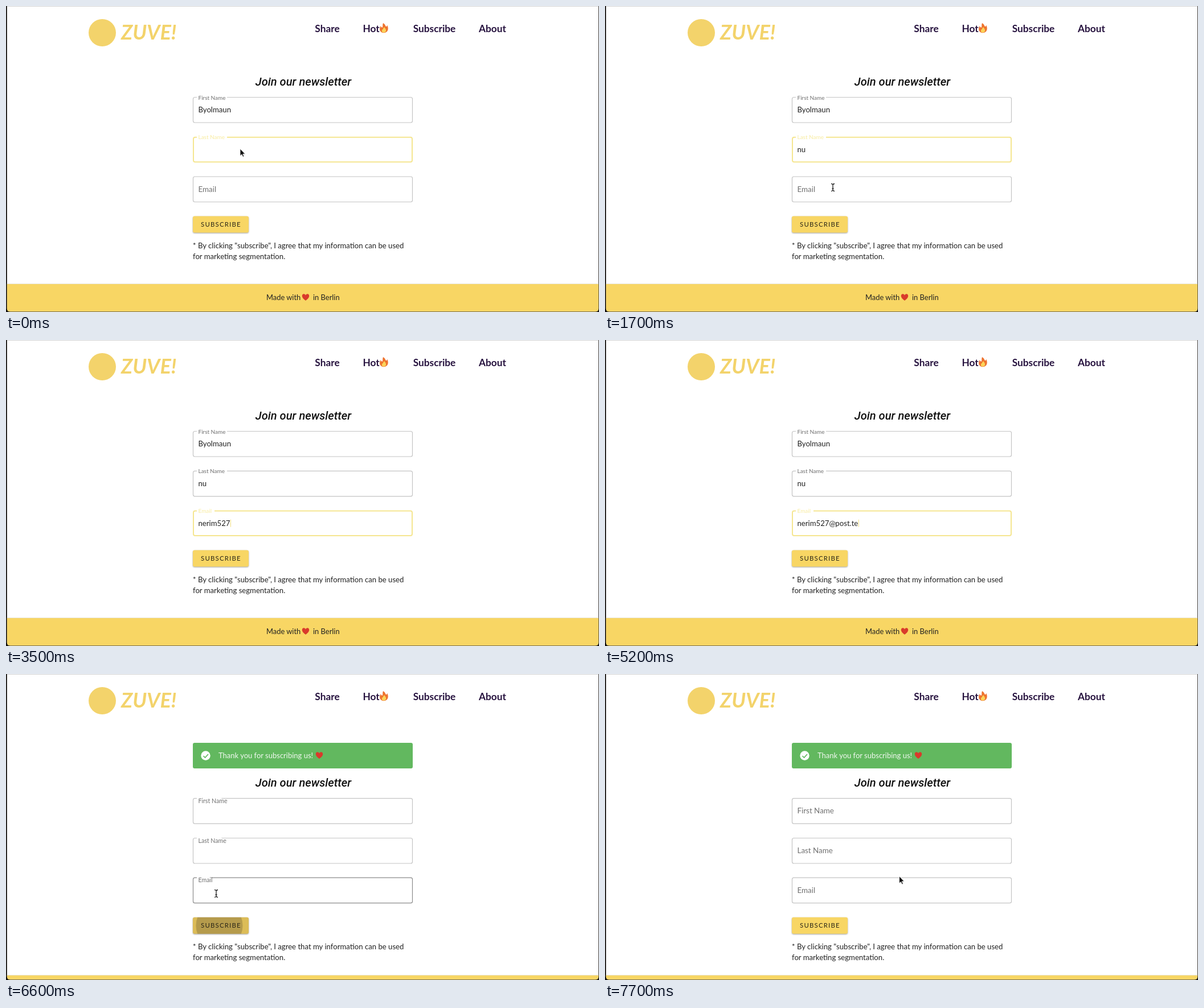
An HTML page for the animation above (7800 ms loop, 1041 by 538 pixels).

```html
<!DOCTYPE html>
<html lang="en">
<head>
<meta charset="utf-8">
<title>Newsletter form</title>
<style>
html, body { margin: 0; height: 100%; overflow: hidden; background: #111; }
svg { display: block; width: 1041px; height: 538px; font: 13.15px Lato, "Open Sans", sans-serif; }
.nav { font-size: 17.3px; font-weight: 700; fill: #27133f; }
.title { font: italic 500 20.15px Roboto, sans-serif; }
.logo { font-size: 36px; font-weight: 700; font-style: italic; }
.mid { text-anchor: middle; }
</style>
</head>
<body>
<svg id="stage" viewBox="0 0 1041 538"></svg>
<script>
const LOOP = 7800, STEP = 100;
const FOCUS_EMAIL = 1800, CLICK = 6350, BLUR = 6480, RESET = 6587;
const SHIFT = 58.2, LEFT = 328, RIGHT = 713.5, FIELD_H = 44.5;
const YELLOW = [248, 214, 100], GREY = [112, 112, 112], PALE = [248, 236, 160];
const LAST = 'nu', EMAIL = 'nerim527@post.test';
const LAST_KEYS = [800, 1100];
const EMAIL_KEYS = [2100, 2300, 2500, 2700, 2900, 3100, 3300, 3400,
  3900, 4100, 4300, 4500, 4700, 4850, 5000, 5150, 5350, 5500];
// time, x, y
const MOUSE = [[0, 411, 251], [400, 411, 251], [800, 409, 256], [1150, 407, 262], [1300, 404, 279],
  [1700, 400, 319], [5600, 400, 319], [6200, 369, 386], [6700, 369, 386], [7500, 516.5, 355.5], [7800, 516.5, 355.5]];
const HIDDEN = [[800, 1200], [2000, 5600]];

const stage = document.getElementById('stage');
const clamp = u => Math.max(0, Math.min(1, u));
const lerp = (a, b, u) => a + (b - a) * u;
const easeOut = (t, start, dur) => 1 - (1 - clamp((t - start) / dur)) ** 3;
const easeInOut = u => u * u * (3 - 2 * u);
const mix = (a, b, u) => `rgb(${a.map((v, i) => Math.round(lerp(v, b[i], u)))})`;
const typed = (text, keys, t) => text.slice(0, keys.filter(k => k <= t).length);
const text = (x, y, s, attrs = '') => `<text x="${x}" y="${y}" ${attrs}>${s}</text>`;
const rect = (x, y, w, h, attrs) => `<rect x="${x}" y="${y}" width="${w}" height="${h}" ${attrs}/>`;

const heart = (x, y) => `<path transform="translate(${x} ${y})" fill="#d93a2b"
  d="M0 6C-3 3.500-6.200 1-6.200-2.300C-6.200-6.400-1.300-6.800 0-3.300C1.300-6.800 6.200-6.400 6.200-2.300C6.200 1 3 3.500 0 6Z"/>`;

const flame = `<path fill="#ee7430" d="M662 30C667 33 666 37 668 36C669 36 669 34 668.500 33
  C671 36 671.500 41 669.500 44C666 48.500 659 48 657 44C655 40 657 37 658 35C658.500 37 659.500 38 660.500 38C662 36 660.500 33 662 30Z"/>
  <path fill="#fbd45a" d="M663.500 37C667 40 668 43 666.500 45C664.500 47.500 661 47 660 45C659 42 661.500 42 663.500 37Z"/>`;

const header = `
  ${rect(0, 0, 1041, 1, 'fill="#d4d4d4"')}
  <g fill="#f3d36b"><circle cx="169" cy="47" r="24"/>${text(202, 59, 'ZUVE!', 'class="logo"')}</g>
  <g class="nav mid">${text(564, 46, 'Share')}${text(641, 46, 'Hot')}${text(752, 46, 'Subscribe')}${text(854, 46, 'About')}</g>
  ${flame}`;

const alertBox = `
  ${rect(LEFT, 121, 386, 45, 'rx="3" fill="#62b85f"')}
  <circle cx="350.500" cy="143.500" r="8.200" fill="#fff"/>
  <path d="M346.500 144l3 3l5.500-6" fill="none" stroke="#62b85f" stroke-width="1.700"/>
  ${text(373, 148, 'Thank you for subscribing us!', 'font-size="13" fill="#f1f8f0"')}${heart(550, 143)}`;

// rest: 0 = label in the border, 1 = label inside the box; focus and hover: 0 to 1
function field({ y, label, gap, value = '', rest = 0, focus = 0, hover = 0 }) {
  const inset = focus * 0.5, top = y + inset, bottom = y + FIELD_H - inset;
  const left = LEFT + 0.5 + inset, right = RIGHT - inset;
  const notch = rest < 1 ? lerp(gap, 335, rest) : left + 3;
  const border = `M${notch} ${top}H${right - 3}q3 0 3 3V${bottom - 3}q0 3-3 3H${left + 3}q-3 0-3-3V${top + 3}q0-3 3-3H335`;
  const stroke = focus ? '#f5e691' : mix([196, 196, 196], [120, 120, 120], hover);
  return `<path d="${border}" fill="none" stroke="${stroke}" stroke-width="${focus ? 2 : 1.2}"/>
    ${text(337.5, y + lerp(4, 26.5, rest), label, `font-size="${lerp(10, 13.4, rest)}" fill="${mix(GREY, PALE, focus)}"`)}
    ${text(337.5, y + 26.5, value, `fill="#222" ${focus ? 'id="active"' : ''}`)}`;
}

function button(t) {
  const over = t < RESET ? easeOut(t, 6150, 250) : 1 - easeOut(t, RESET, 500);
  const r = 60 * easeInOut(clamp((t - CLICK) / 400));
  const fade = t < CLICK ? 0 : 0.21 * (1 - clamp((t - 6650) / 500));
  return `${rect(LEFT, 370.5, 98, 29, 'rx="3" opacity=".42" filter="url(#soft)"')}
    ${rect(LEFT, 369.5, 98, 29, `rx="3" fill="${mix(YELLOW, [218, 186, 86], over)}"`)}
    <circle cx="374.500" cy="384" r="${r}" opacity="${fade}" clip-path="url(#btn)"/>
    ${text(342, 387.5, 'SUBSCRIBE', 'font-size="11.4" letter-spacing="1.2" fill="#2a2618"')}`;
}

function mouseAt(t) {
  const i = MOUSE.findIndex(m => m[0] > t), [t0, x0, y0] = MOUSE[i - 1], [t1, x1, y1] = MOUSE[i];
  const u = easeInOut((t - t0) / (t1 - t0));
  return [lerp(x0, x1, u), lerp(y0, y1, u)];
}

function pointer(t, shift) {
  if (HIDDEN.some(([a, b]) => t >= a && t < b)) return '';
  const [x, y] = mouseAt(t);
  const inField = [160.5, 230.3, 300].some(f => y >= f + shift && y <= f + shift + FIELD_H + 5);
  const inButton = x < 426 && y > 369 + shift && y < 399 + shift;
  let shape = '<path d="M0 0V12.500L2.900 9.900L4.900 14.300L6.900 13.400L5 9.200H8.800Z" fill="#111" stroke="#fff" stroke-width=".8"/>';
  if (inButton) shape = '<path d="M-2 0Q-1-2 0 0V5L6 6.500Q8 7.500 7 10L5.500 14H-1L-5 8Q-5 6-3 7L-2 8Z" fill="#fff" stroke="#111"/>';
  else if (inField && t >= 300) shape = '<path d="M-3-6.500Q0-6.500 0-4Q0-6.500 3-6.500M0-4V4M-3 6.500Q0 6.500 0 4Q0 6.500 3 6.500M-1.500 2H1.500" fill="none" stroke="#222" stroke-width="1.300"/>';
  return `<g transform="translate(${x} ${y})">${shape}</g>`;
}

function draw(t) {
  const done = t >= RESET, shift = done ? SHIFT : 0, footer = done ? 530 : 489;
  const reset = done ? easeOut(t, RESET, 200) : 0;
  const onLast = t < FOCUS_EMAIL, onEmail = !onLast && t < BLUR;
  const emailRest = done ? reset : 1 - easeOut(t, FOCUS_EMAIL - 1, 200);
  const hover = done && t < 7400 ? 0.75 : 0;
  stage.innerHTML = `
    <defs>
      <clipPath id="page"><path d="M1.800 0H1040.200V532q0 5.300-5.500 5.300H7.300q-5.500 0-5.500-5.300Z"/></clipPath>
      <clipPath id="btn">${rect(LEFT, 369.5, 98, 29, 'rx="3"')}</clipPath>
      <filter id="soft" x="-10%" y="-30%" width="120%" height="160%"><feGaussianBlur stdDeviation="1.200"/></filter>
    </defs>
    ${rect(0, 0, 1041, 538, 'fill="#161310"')}
    <g clip-path="url(#page)">
      ${rect(0, 0, 1041, 538, 'fill="#fff"')}
      ${header}${done ? alertBox : ''}
      <g transform="translate(0 ${shift})" fill="#222">
        ${text(522, 140, 'Join our newsletter', 'class="title mid" fill="#111"')}
        ${field({ y: 160.5, label: 'First Name', gap: 388, value: done ? '' : 'Byolmaun', rest: reset })}
        ${field({ y: 230.3, label: 'Last Name', gap: 388, value: done ? '' : typed(LAST, LAST_KEYS, t), rest: reset, focus: +onLast })}
        ${field({ y: 300, label: 'Email', gap: 366, value: done ? '' : typed(EMAIL, EMAIL_KEYS, t), rest: emailRest, focus: +onEmail, hover })}
        ${rect(0, 0, 1, 13, 'id="caret" fill="#f3df80" visibility="hidden"')}
        ${button(t)}
        ${text(LEFT, 425.5, '* By clicking "subscribe", I agree that my information can be used')}
        ${text(LEFT, 445, 'for marketing segmentation.')}
      </g>
      ${rect(0, footer - 1, 1041, 1, 'fill="#e9e4d3"')}
      ${rect(0, footer, 1041, 50, 'fill="#f8d664"')}
      ${done ? '' : `<g font-size="12.9" fill="#222">${text(457, 517, 'Made with')}${text(539, 517, 'in Berlin')}</g>${heart(526, 512)}`}
    </g>
    ${pointer(t, shift)}`;
  placeCaret(t, onLast);
}

function placeCaret(t, onLast) {
  const active = document.getElementById('active'), caret = document.getElementById('caret');
  if (!active) return;
  const lastKey = [-600, ...LAST_KEYS, FOCUS_EMAIL, ...EMAIL_KEYS].filter(k => k <= t).pop();
  if ((t - lastKey) % 1000 >= 500) return;
  caret.setAttribute('x', 338 + active.getComputedTextLength());
  caret.setAttribute('y', onLast ? 246 : 315.7);
  caret.setAttribute('visibility', 'visible');
}

let shown = -1;
function tick() {
  const t = Math.floor(performance.now() % LOOP / STEP) * STEP;
  if (t !== shown) draw(shown = t);
  requestAnimationFrame(tick);
}
tick();
</script>
</body>
</html>
```
